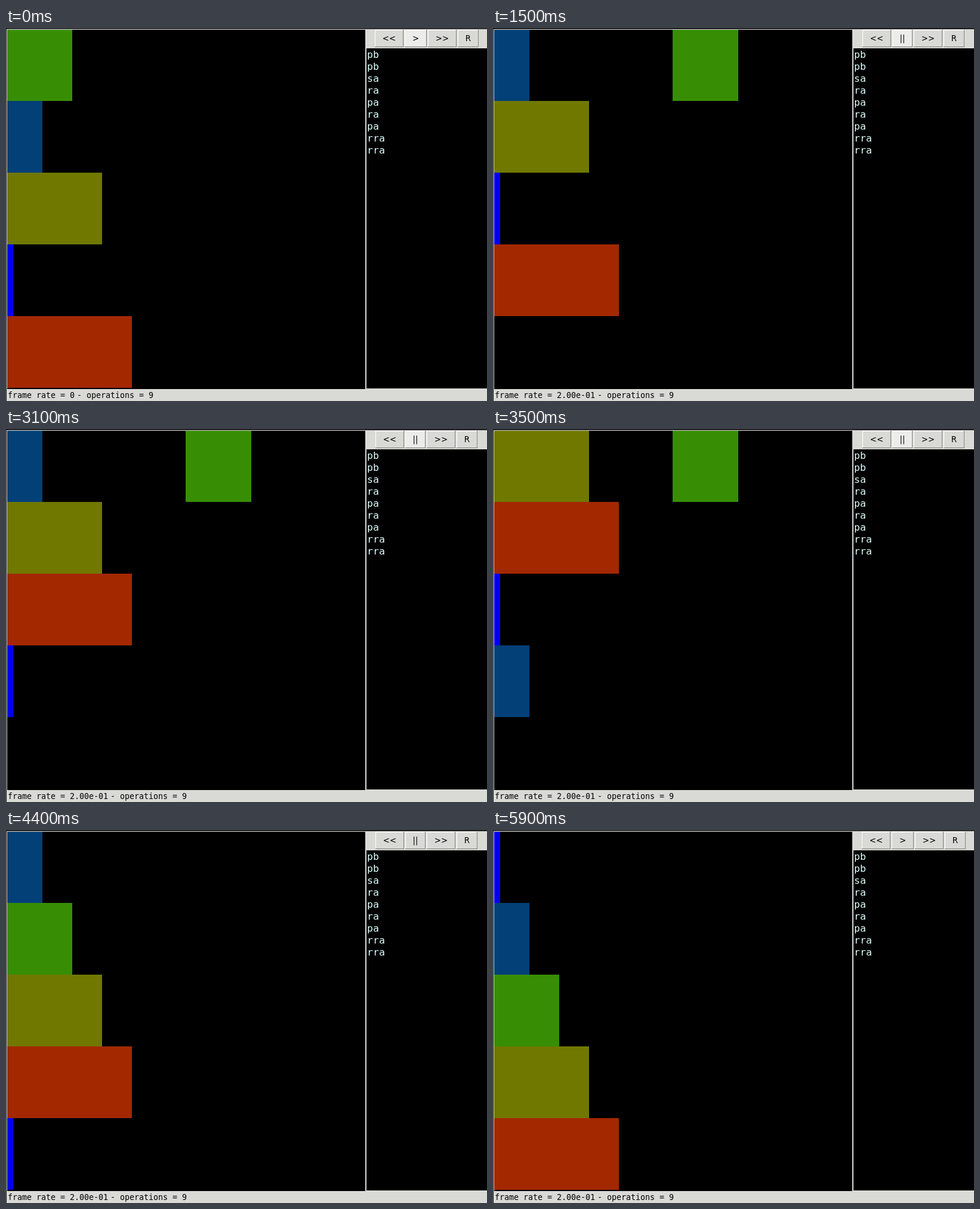
Recreate the animation shown at these times as an HTML page with a canvas. Size 806 by 624 pixels, loop 6 s.

```html
<!DOCTYPE html>
<html lang="en">
<head>
<meta charset="utf-8">
<title>Stack sorting</title>
<style>
  html, body { margin: 0; width: 100%; height: 100%; overflow: hidden; background: #000; }
  canvas { display: block; }
</style>
</head>
<body>
<canvas id="stage" width="806" height="624"></canvas>
<script>
const ctx = document.getElementById('stage').getContext('2d');
const LOOP = 6000;
const PANEL = '#d9d9d6';
const ACTIVE = '#ececea';
const MONO = '"DejaVu Sans Mono", monospace';
const SANS = '"DejaVu Sans", sans-serif';
const ROW = 120;

const bars = {
  1: { width: 11, color: '#0000f0' },
  2: { width: 60, color: '#034078' },
  3: { width: 110, color: '#378e04' },
  4: { width: 160, color: '#707800' },
  5: { width: 210, color: '#a32800' },
};
const start = [3, 2, 4, 1, 5];
const operations = ['pb', 'pb', 'sa', 'ra', 'pa', 'ra', 'pa', 'rra', 'rra'];
const opTimes = [1500, 2300, 2300, 2700, 3100, 3500, 4000, 4400, 4800];

const apply = {
  pb: (a, b) => b.unshift(a.shift()),
  pa: (a, b) => a.unshift(b.shift()),
  sa: a => a.unshift(...a.splice(0, 2).reverse()),
  ra: a => a.push(a.shift()),
  rra: a => a.unshift(a.pop()),
};

function rect(x, y, w, h, color) {
  ctx.fillStyle = color;
  ctx.fillRect(x, y, w, h);
}

function text(str, x, y, size, family, color, align = 'left') {
  ctx.font = `${size}px ${family}`;
  ctx.textAlign = align;
  ctx.fillStyle = color;
  ctx.fillText(str, x, y);
}

function button(label, x, w, active, pressed) {
  const light = '#ffffff', dark = '#828280';
  rect(x, 3, w, 29, pressed ? light : dark);
  rect(x, 3, w - 1, 28, pressed ? dark : light);
  rect(x + 1, 4, w - 2, 27, active ? ACTIVE : PANEL);
  const shift = pressed ? 1 : 0;
  text(label, x + w / 2 + shift, 22 + shift, 13.33, SANS, '#000', 'center');
}

function drawStack(stack, x) {
  stack.forEach((value, i) => {
    const { width, color } = bars[value];
    rect(x, 2 + i * ROW, width, ROW, color);
  });
}

function drawStacks(t) {
  const a = [...start], b = [];
  operations.forEach((op, i) => {
    if (t >= opTimes[i]) apply[op](a, b);
  });
  rect(1, 2, 602, 602, '#000');
  drawStack(a, 1);
  drawStack(b, 301);
  // the canvas border lies over the bars
  rect(1, 2, 602, 1, PANEL);
  rect(1, 2, 1, 602, PANEL);
  rect(602, 2, 2, 602, PANEL);
}

function drawButtons(t) {
  const playing = t >= 1100 && t < 5400;
  const hover = t < 4000;
  const pressed = t >= 900 && t < 1100;
  let x = playing ? 619 : 618;
  const row = [['<<', 48], playing ? ['||', 34] : ['>', 37], ['>>', 48], ['R', 35]];
  row.forEach(([label, w], i) => {
    button(label, x, w, i === 1 && hover, i === 1 && pressed);
    x += w + 2;
  });
}

function drawStatus(t) {
  const rate = 'frame rate = ' + (t < 1100 ? '0' : '2.00e-01');
  text(rate, 3, 619, 13.3, MONO, '#000');
  text('- operations = 9', 7 + rate.length * 8, 619, 13.3, MONO, '#000');
}

function draw(t) {
  rect(0, 0, 806, 624, '#1c1c1c');
  rect(1, 0, 805, 2, t < 900 || t >= 5900 ? '#303030' : '#1e1e1e');
  rect(1, 2, 805, 622, PANEL);
  drawStacks(t);
  rect(604, 34, 202, 569, '#000');
  operations.forEach((op, i) => text(op, 605, 50 + i * 20, 16.6, MONO, '#e0ffff'));
  drawButtons(t);
  drawStatus(t);
}

const origin = performance.now();
function tick() {
  draw((performance.now() - origin) % LOOP);
  requestAnimationFrame(tick);
}
tick();
</script>
</body>
</html>
```
